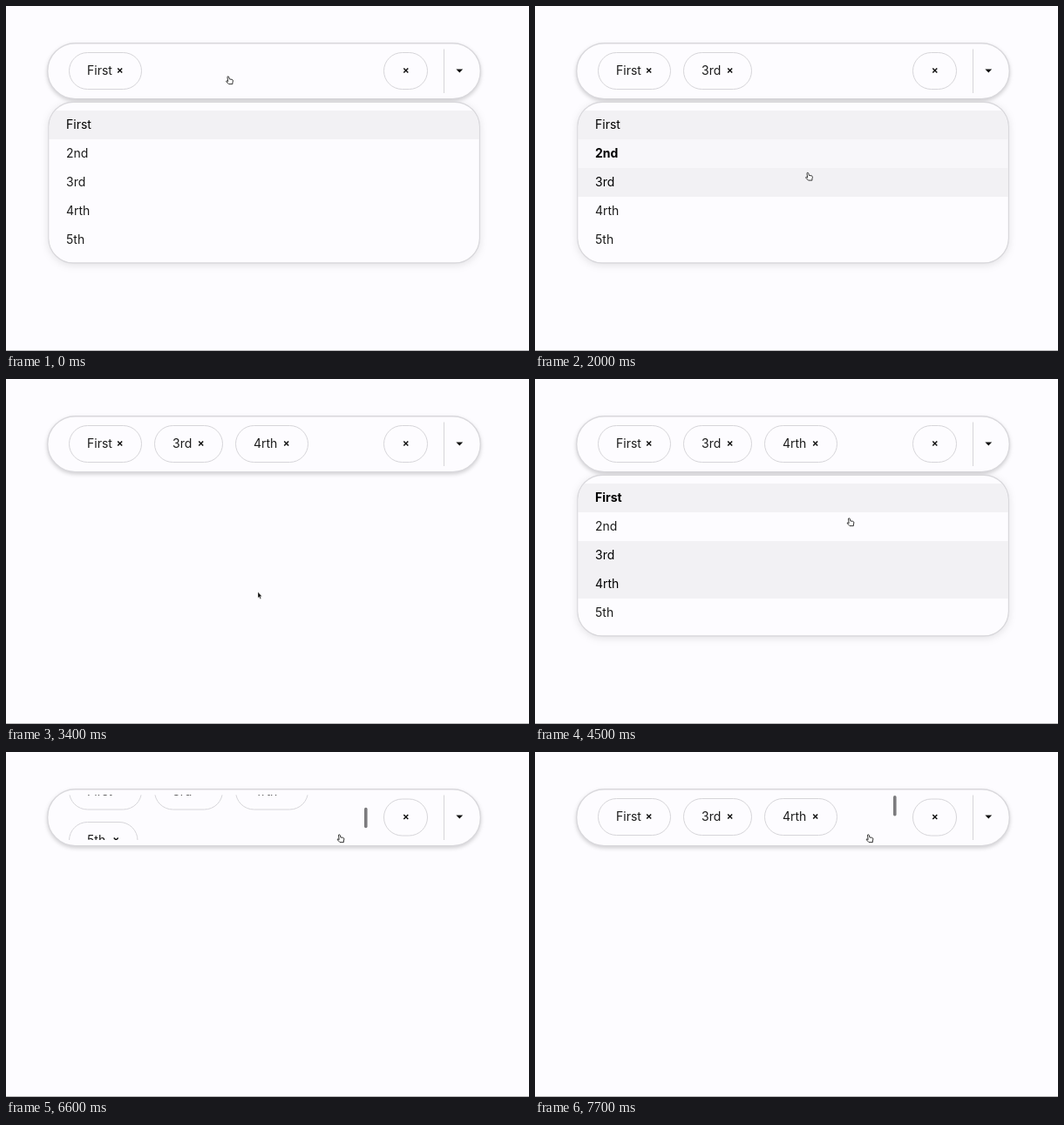
Recreate the animation shown at these times as an HTML page. Size 600 px wide and 396 px high, loop 8000 ms.

```html
<!DOCTYPE html>
<html lang="en">
<head>
<meta charset="utf-8">
<title>Multi-select</title>
<style>
  html, body { margin: 0; width: 100%; height: 100%; overflow: hidden; background: #fdfcff; }
  svg { display: block; width: 600px; height: 396px; }
  text { font: 14px Inter, "Open Sans", sans-serif; fill: #1c1c1c; }
  .on { fill: #000; }
  .hover { font-weight: 700; fill: #000; }
  .pill { fill: none; stroke: #d6d5d9; }
  .box { fill: #fdfcff; stroke: #d9d8dc; stroke-width: 1.4; }
  .cross { fill: none; stroke: #111; stroke-width: 1.5; }
  #bar { filter: drop-shadow(0 2px 2px rgba(0, 0, 0, .17)); }
  #bar.idle { filter: drop-shadow(0 2px 3px rgba(0, 0, 0, .09)); }
  #panel { filter: drop-shadow(0 2px 4px rgba(0, 0, 0, .1)); }
</style>
</head>
<body>
<svg viewBox="0 0 600 396">
  <defs>
    <clipPath id="view"><rect x="60" y="49.3" width="356" height="51.7"/></clipPath>
    <clipPath id="round"><rect x="49.5" y="110.7" width="493" height="183.6" rx="28"/></clipPath>
  </defs>
  <path d="M0 395.5H600" stroke="#b8b7ba"/>
  <rect id="bar" class="box" x="47.7" y="42.7" width="496.6" height="64" rx="32"/>
  <g clip-path="url(#view)"><g id="chips"></g></g>
  <rect id="thumb" x="411" width="3.6" height="23.5" rx="1.8" fill="#7c7b7e"/>
  <g id="clear">
    <rect class="pill" x="433.5" y="53.5" width="50" height="42" rx="21"/>
    <path class="cross" d="M456.3 71.5l5 5m0-5l-5 5"/>
  </g>
  <path id="rule" stroke="#d6d5d9"/>
  <path d="M516.4 72.6H524.2L520.3 76.5Z" fill="#111"/>
  <g id="menu">
    <rect id="panel" class="box" x="48.9" y="110.2" width="494.4" height="184.8" rx="28.5"/>
    <g id="rows" clip-path="url(#round)"></g>
  </g>
  <path id="hand" d="M-1 1Q-1.2 -.2 -.2 -.2Q.6 -.2 .9 1L1.4 3L4.2 3.3Q5.4 3.6 5.4 5L4.9 7V8.6H.5L-2 6Q-2.8 4.9 -1.6 4.8L-.3 5.6Z"
    fill="#fff" stroke="#222" stroke-width=".9" stroke-linejoin="round"/>
  <path id="arrow" d="M0 0V6.8L1.5 5.5L2.6 8L3.7 7.5L2.6 5.1H4.6Z" fill="#111" stroke="#fff" stroke-width=".3"/>
</svg>
<script>
const LOOP = 8000, STEP = 100, TOP = 120, ROW = 33, MAX_SCROLL = 59;
const $ = id => document.getElementById(id);

function add(parent, tag, attrs, label) {
  const el = document.createElementNS('http://www.w3.org/2000/svg', tag);
  for (const k in attrs) el.setAttribute(k, attrs[k]);
  if (label) el.textContent = label;
  return parent.appendChild(el);
}

// Time each option is picked; Infinity means never.
const options = [
  { label: 'First', at: 0 },
  { label: '2nd', at: Infinity },
  { label: '3rd', at: 1000 },
  { label: '4rth', at: 3400 },
  { label: '5th', at: 5300 }
];
options.forEach((o, i) => {
  const y = TOP + i * ROW;
  o.back = add($('rows'), 'rect', { x: 48, y, width: 496, height: ROW });
  o.text = add($('rows'), 'text', { x: 69, y: y + 21.3 }, o.label);
});

function chip(label, x, y, width, at) {
  const g = add($('chips'), 'g', {});
  add(g, 'rect', { class: 'pill', x, y, width, height: 42, rx: 21 });
  add(g, 'text', { x: x + 20.5, y: y + 25.8 }, label);
  add(g, 'path', { class: 'cross', d: `M${x + width - 27.3} ${y + 18}l5 5m0-5l-5 5` });
  return { g, at };
}
const chips = [
  chip('First', 72.5, 53.5, 83, 0),
  chip('3rd', 170.5, 53.5, 78, 1000),
  chip('4rth', 263.5, 53.5, 83, 3400),
  chip('5th', 72.5, 110, 78.5, 5300)
];

const smooth = k => k * k * (3 - 2 * k);
const easeOut = k => k * (2 - k);

// time, x, y, easing into the point
const path = [
  [0, 255, 81],
  [600, 255, 217],
  [1100, 255, 217],
  [1500, 293, 91],
  [1600, 298, 89.5],
  [2000, 313, 191.5],
  [2500, 288, 260, easeOut],
  [2600, 288, 260],
  [3200, 289, 244.5],
  [3500, 289, 244.5],
  [4000, 343, 88],
  [4100, 346, 86],
  [4500, 360.5, 160],
  [5300, 266, 276, easeOut],
  [5700, 266, 276],
  [5800, 278, 248.5],
  [6300, 382.5, 95, easeOut],
  [LOOP, 382.5, 95]
];

function pointer(t) {
  const i = Math.max(1, path.findIndex(p => p[0] >= t));
  const [t0, x0, y0] = path[i - 1], [t1, x1, y1, ease = smooth] = path[i];
  const k = ease((t - t0) / (t1 - t0));
  return [x0 + (x1 - x0) * k, y0 + (y1 - y0) * k];
}

const ramp = (t, a, b) => smooth(Math.min(1, Math.max(0, (t - a) / (b - a))));
const within = (t, a, b) => t >= a && t < b;
const isOpen = t => t < 1000 || within(t, 1600, 3400) || within(t, 4100, 5300);
const show = (el, on) => el.setAttribute('visibility', on ? 'inherit' : 'hidden');

function draw(t) {
  const open = isOpen(t), tall = t >= 5300 ? 1 : 0;
  const [x, y] = pointer(t);

  $('bar').setAttribute('height', 64 + tall);
  $('bar').setAttribute('class', tall && y > 107 ? 'box idle' : 'box');
  $('clear').setAttribute('transform', `translate(0 ${tall * .5})`);
  $('rule').setAttribute('d', `M502.5 49.5V${100 + tall}`);

  const scroll = ramp(t, 6400, 6800) - ramp(t, 7200, 7700);
  $('chips').setAttribute('transform', `translate(0 ${-scroll * MAX_SCROLL})`);
  chips.forEach(c => show(c.g, t >= c.at));
  show($('thumb'), t >= 6500);
  $('thumb').setAttribute('y', 50 + scroll * 27.5);

  // Row highlight trails the pointer by one step.
  const hover = Math.floor((pointer(Math.max(0, t - STEP))[1] - TOP) / ROW);
  show($('menu'), open);
  options.forEach((o, i) => {
    const on = t >= o.at, over = i === hover;
    o.back.setAttribute('fill', on ? '#f2f1f4' : over ? '#f8f7fa' : '#fdfcff');
    o.text.setAttribute('class', over ? 'hover' : on ? 'on' : '');
  });

  const hand = open || y < 107 || within(t, 5300, 5400);
  for (const id of ['hand', 'arrow']) {
    show($(id), hand === (id === 'hand'));
    $(id).setAttribute('transform', `translate(${x} ${y})`);
  }
}

const start = performance.now();
function tick() {
  const t = (performance.now() - start) % LOOP;
  draw(Math.floor(t / STEP) * STEP);
  requestAnimationFrame(tick);
}
tick();
</script>
</body>
</html>
```
